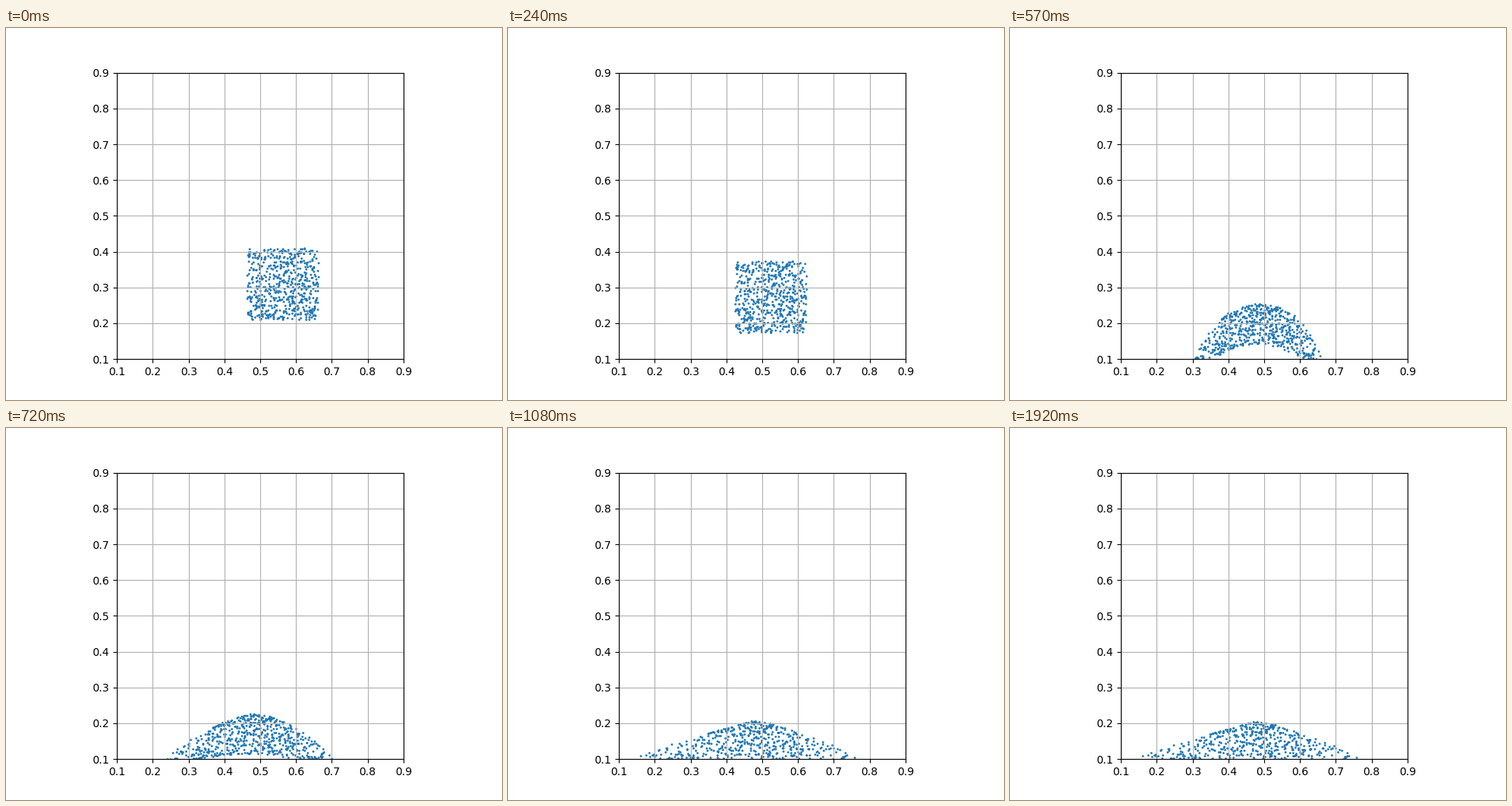
These frames come from a looping animation (640x480 px, 2.1 s). A matplotlib script:

```python
import numpy as np
import matplotlib.pyplot as plt
from matplotlib.animation import FuncAnimation

FRAMES, INTERVAL = 70, 30
COUNT = 600
SIDE = 0.2
IMPACT = 13     # frame at which the block reaches the floor
SPREAD = 22     # frames the foot of the heap keeps sliding
SLUMP = 6       # time constant of the sinking top
BOUNCE = 13     # frames the middle is lifted off the floor

rng = np.random.default_rng(7)
u, v = rng.random((2, COUNT))
s = 2 * u - 1
arch = 1 - s**2


def mix(a, b, k):
    return a + (b - a) * k


def positions(n):
    # Free fall of the block until impact
    fall = min(n, IMPACT)
    x = 0.462 - 0.00487 * fall
    y = 0.2095 + 0.00195 * fall - 0.0008 * fall**2

    # Collapse into a heap afterwards
    t = max(n - IMPACT, 0)
    spread = 1 - (1 - min(t / SPREAD, 1)) ** 1.3
    slump = 1 - np.exp(-t / SLUMP)
    bounce = np.sin(np.pi * min(t / BOUNCE, 1))

    left = mix(mix(x, 0.104, spread), mix(x, 0.385, slump), v)
    right = mix(mix(x + SIDE, 0.784, spread), mix(x + SIDE, 0.575, slump), v)
    half = (right - left) / 2 + 0.16 * spread * v * (1 - v)
    across = mix(s, s**3, 0.25 * spread)

    bottom = mix(y, 0.09, slump) + 0.05 * bounce * arch**2
    top = mix(y + SIDE, 0.18, slump) + (0.025 * slump + 0.015 * bounce) * arch
    height = v ** (1 + 0.3 * spread)
    return np.column_stack([(left + right) / 2 + half * across,
                            mix(bottom, top, height)])


fig, ax = plt.subplots(figsize=(6.4, 4.8), dpi=100)
ticks = np.linspace(0.1, 0.9, 9)
ax.set(xlim=(0.1, 0.9), ylim=(0.1, 0.9), xticks=ticks, yticks=ticks, aspect="equal")
ax.grid(True)
grains = ax.scatter(*positions(0).T, s=1, color="tab:blue")


def update(n):
    grains.set_offsets(positions(n))
    return (grains,)


anim = FuncAnimation(fig, update, frames=FRAMES, interval=INTERVAL,
                     repeat=True, repeat_delay=0)
plt.show()
```
